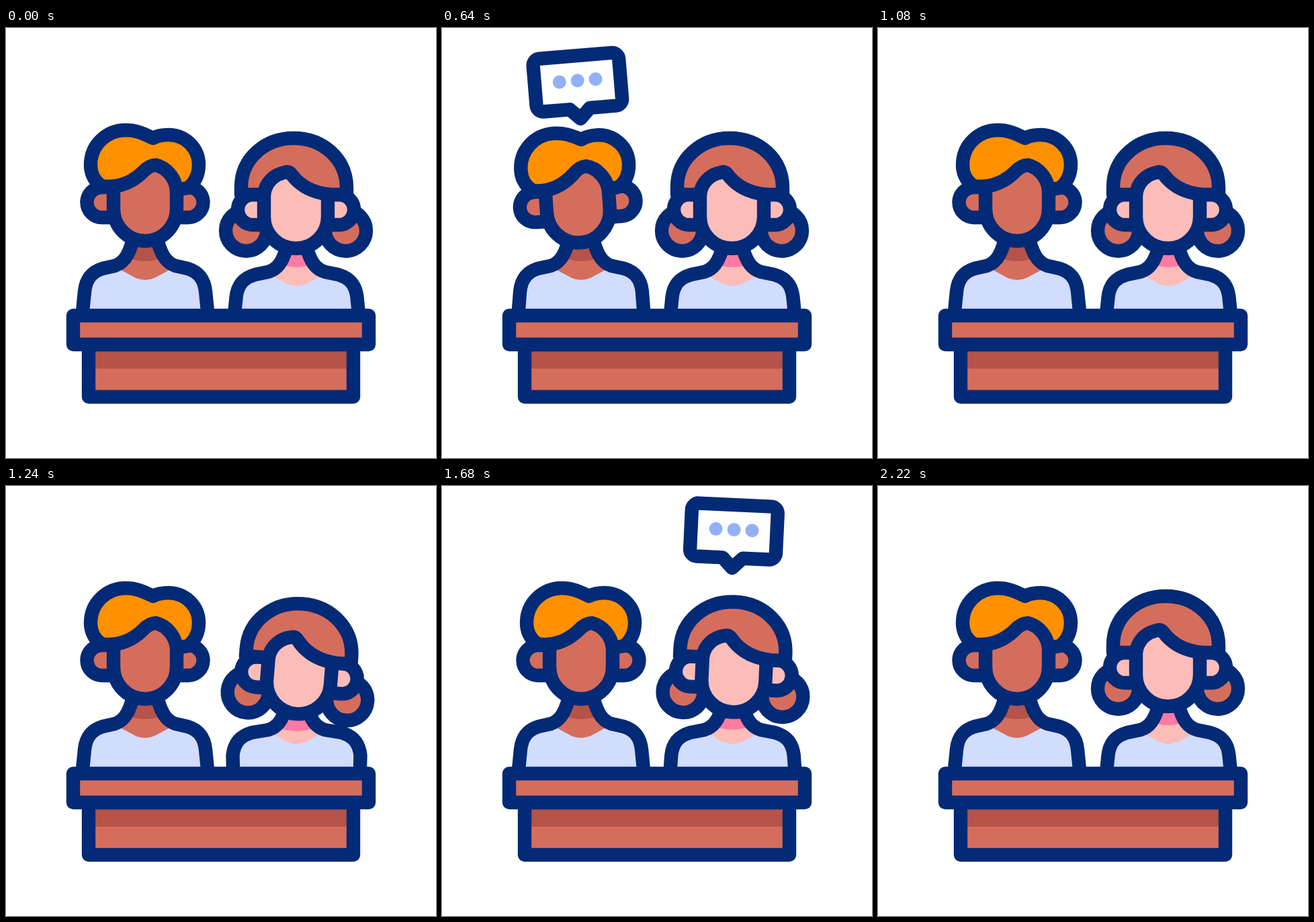
An HTML page for the animation above (2420 ms loop, 640 px wide and 640 px high).

```html
<!DOCTYPE html>
<html lang="en">
<head>
<meta charset="utf-8">
<title>Two people talking</title>
<style>
  html, body { margin: 0; height: 100%; overflow: hidden; background: #fff; }
  svg { display: block; width: 100vw; height: 100vh; }
  .line { stroke: #032a76; stroke-width: 20.4; stroke-linejoin: round; stroke-linecap: round; }
  .none { fill: none; }
  .white { fill: #fff; }
  .brown { fill: #d56d5d; }
  .dark { fill: #b55348; }
  .rose { fill: #fcbdb9; }
  .pink { fill: #ff7ba3; }
  .shirt { fill: #d2dcfd; }
  .gold { fill: #ff9100; }
  .dot { fill: #92b1f5; }
</style>
</head>
<body>
<svg viewBox="0 0 640 640">
  <defs>
    <g id="bubble">
      <path class="line white" d="M153 41H261a10 10 0 0 1 10 10V110a10 10 0 0 1-10 10H222L207 135 192 120H153a10 10 0 0 1-10-10V51a10 10 0 0 1 10-10Z"/>
      <g class="dot"><circle cx="180" cy="78" r="10"/><circle cx="207" cy="78" r="10"/><circle cx="234" cy="78" r="10"/></g>
    </g>
    <path id="shirt" d="M-92 432L-90 392-84 372-60 357H60L84 372 90 392 92 432Z"/>
    <path id="collar" d="M-24 316H24L29 345 42 357 14 372Q0 378-14 372L-42 357-29 345Z"/>
    <path id="shade" d="M-20 314H20L28 341Q0 353-28 341Z"/>
    <path id="ears" d="M160 237H143A22.5 22.5 0 0 0 143 282H160M254 237H271A22.5 22.5 0 0 1 271 282H254"/>
  </defs>

  <g id="man">
    <g transform="translate(207 0)">
      <use href="#shirt" class="shirt"/>
      <use href="#collar" class="brown"/>
      <use href="#shade" class="dark"/>
      <path class="side line none"/>
      <path class="side line none" transform="scale(-1 1)"/>
    </g>
    <g class="head">
      <use href="#ears" class="line brown"/>
      <path class="line brown" d="M160 195V269A47 48 0 0 0 254 269V195Z"/>
      <path class="line gold" d="M142 235C130 227 126 214 126 204C126 173 151 152 178 152C196 152 206 158 219 164C226 160 234 159 242 159C268 159 287 180 287 203C287 218 281 230 271 238L254 241C252 224 240 208 223 204Q213 204 203 215C187 230 168 239 142 235Z"/>
    </g>
    <use href="#bubble" class="talk"/>
  </g>

  <g id="woman">
    <g transform="translate(432.5 9)">
      <use href="#shirt" class="shirt"/>
      <use href="#collar" class="rose"/>
      <use href="#shade" class="pink shadow"/>
      <path class="side line none"/>
      <path class="side line none" transform="scale(-1 1)"/>
    </g>
    <g class="head">
      <g class="line brown"><circle cx="357.5" cy="301.5" r="30.5"/><circle cx="505.5" cy="301.5" r="30.5"/></g>
      <use href="#ears" class="line rose" x="224.5" y="11"/>
      <path class="line rose" d="M384 205V281A47.5 47 0 0 0 479 281V205Z"/>
      <path class="line brown" d="M350 248V237C350 194 386 164 428 164C472 164 507 195 507 238V248H485C456 246 437 234 425 218Q421 213 415 215C399 218 386 230 384 248Z"/>
    </g>
    <g transform="translate(224.5 -13)"><use href="#bubble" class="talk"/></g>
  </g>

  <path class="brown" d="M123 471H517V549H123Z"/>
  <path class="dark" d="M123 471H517V507H123Z"/>
  <path class="line none" d="M123 471H517V549H123Z"/>
  <path class="line brown" d="M100 428H540V471H100Z"/>
</svg>
<script>
const LOOP = 2420, TURN = 1080, NOD = TURN / 3;
const { PI, sin, cos, exp } = Math;

const clamp = u => Math.min(1, Math.max(0, u));
const ramp = (from, to, t) => {
  const u = clamp((t - from) / (to - from));
  return u * u * (3 - 2 * u);
};
const backOut = u => 1 + 2.7 * (u - 1) ** 3 + 1.7 * (u - 1) ** 2;

// lean: head tilt in degrees, sway: ms per half tilt, rock: ms per bubble swing
const people = [
  { id: 'man', x: 207, y: 327, start: 0, side: -1, lean: 5.2, sway: 900, nod: 6, rock: 360, slim: 2 },
  { id: 'woman', x: 432, y: 333, start: TURN, side: 1, lean: 6.7, sway: 690, nod: 11.5, rock: 460, slim: 6 }
];
for (const p of people) {
  const find = name => document.querySelectorAll(`#${p.id} .${name}`);
  p.sides = find('side');
  for (const part of ['head', 'talk', 'shadow']) p[part] = find(part)[0];
}

// Outline from hip to neck, with the shoulder pushed out by w and the neck pulled in by n.
const sidePath = (w, n) => `M94 432L${90 + w} 392C${88 + w} 373 ${79 + w} 363 ${64 + w - n * .4} 358`
  + `L${47 - n * .8} 354C${35 - n} 350 ${27 - n} 340 ${21 - n} 318`;

function pose(p, t) {
  const s = Math.min(TURN, Math.max(0, t - p.start));
  const drop = p.nod * sin(PI * s / NOD) ** 2;
  const tilt = p.side * p.lean * sin(PI * s / p.sway) * (1 - ramp(900, TURN, s));
  const wide = 5 * ramp(0, 150, s) * (1 - ramp(150, 820, s));
  const swing = p.side * 15 * exp(-s / 1000) * cos(PI * s / p.rock) ** 2;
  const size = s > 170 ? backOut(clamp((s - 170) / 260)) * (1 - ramp(960, 1060, s)) : 0;

  p.head.setAttribute('transform', `translate(0 ${drop}) rotate(${tilt} ${p.x} ${p.y})`);
  p.shadow?.setAttribute('transform', `translate(0 ${drop * .8})`);
  p.sides.forEach(e => e.setAttribute('d', sidePath(wide, p.slim)));
  p.talk.setAttribute('visibility', size > 0 ? 'visible' : 'hidden');
  p.talk.setAttribute('transform',
    `translate(207 143) rotate(${swing}) scale(${size}) translate(-207 -143)`);
}

const begin = performance.now();
function draw() {
  const t = (performance.now() - begin) % LOOP;
  people.forEach(p => pose(p, t));
  requestAnimationFrame(draw);
}
draw();
</script>
</body>
</html>
```
